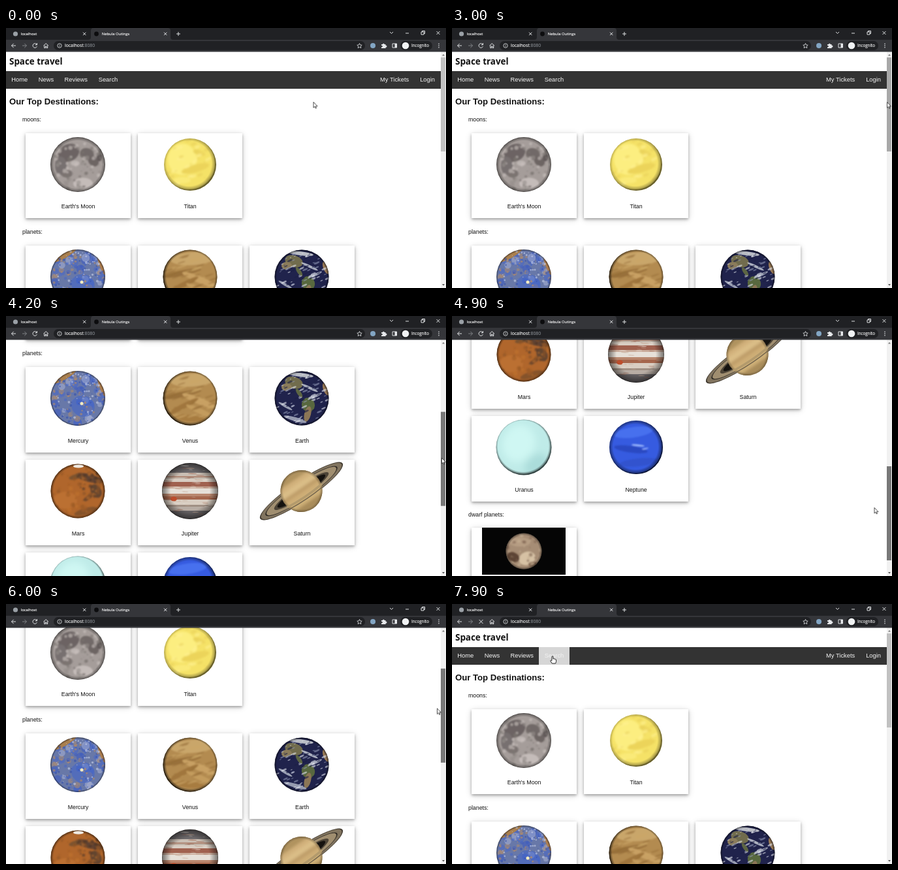
These frames come from a looping animation (674 px wide and 398 px high, 8000 ms). An HTML page:

```html
<!DOCTYPE html>
<html lang="en">
<head>
<meta charset="utf-8">
<title>Space travel</title>
<style>
@property --s { syntax: "<number>"; inherits: true; initial-value: 0; }
html, body { margin: 0; width: 100%; height: 100%; overflow: hidden; background: #fff; }
#stage {
  position: relative; width: 674px; height: 398px; overflow: hidden; background: #fff;
  font: 8.8px/20px "Liberation Sans", Arial, sans-serif; color: #111;
  animation: scroll 8s infinite;
}
#stage * { box-sizing: border-box; }
.abs, .card, .card svg, nav, nav span, #view, #page, #bar, #thumb, #chrome, #cursor { position: absolute; }
.abs, nav span { white-space: nowrap; }

#view { left: 0; top: 36px; width: 666px; height: 362px; overflow: hidden; }
#page { left: 0; top: -36px; width: 666px; height: 899px; transform: translateY(calc(var(--s) * -1px)); }
h1, h2 { margin: 0; left: 5px; font-weight: bold; }
h1 { top: 41px; font: bold 13.4px/20px "Open Sans", "Noto Sans", sans-serif; }
h2 { top: 103px; font-size: 13.15px; }
nav { left: 0; top: 66px; width: 666px; height: 27px; background: #333; color: #f4f4f4; font-size: 9.35px; line-height: 27px; }
nav span { top: 0; padding: 0 8.3px; height: 27px; }
#search { animation: hover 8s step-end infinite; }

.card { width: 160.5px; height: 130.5px; background: #fff; text-align: center;
  box-shadow: 0 2px 4px rgba(0,0,0,.3), 0 2px 10px rgba(0,0,0,.16); }
.card svg { left: 16px; top: 0; width: 128px; height: 96px; }
.card span { position: absolute; left: 0; right: 0; top: 102.5px; }
.card.wide { height: 106px; }
.wide svg { top: -12px; }
.wide span { top: 78px; }

#bar { left: 666px; top: 36px; width: 8px; height: 362px; background: #f1f1f1; }
#thumb { left: 0; top: 9px; width: 7px; height: 144px; background: #c1c1c1;
  transform: translateY(calc(var(--s) * .3988px)); animation: press 8s step-end infinite; }
#chrome { left: 0; top: 0; width: 674px; height: 37px; }
#chrome text { font: 6.2px "Open Sans", "Noto Sans", sans-serif; fill: #fff; stroke: #fff; stroke-width: .12; }
#chrome .address { font-size: 6.85px; }
.line { fill: none; stroke: #e8eaed; stroke-width: .95; }
.idle { animation: idle 8s step-end infinite; }
.busy { opacity: 0; animation: busy 8s step-end infinite; }

#cursor { left: 0; top: 0; width: 12px; height: 14px; overflow: visible; animation: move 8s infinite; }
#arrow { animation: arrow 8s step-end infinite; }
#hand { opacity: 0; animation: hand 8s step-end infinite; }

@keyframes scroll {
  0%, 41.25% { --s: 0; animation-timing-function: steps(3); }
  45% { --s: 86; animation-timing-function: steps(6); }
  52.5% { --s: 255; animation-timing-function: steps(7); }
  61.25% { --s: 464; animation-timing-function: steps(2); }
  63.75% { --s: 501; animation-timing-function: steps(9); }
  75% { --s: 135; animation-timing-function: steps(3); }
  78.75%, 100% { --s: 0; }
}
@keyframes move {
  0%, 21.25% { transform: translate(470.5px, 113px); animation-timing-function: steps(2); }
  23.75% { transform: translate(529px, 115px); animation-timing-function: steps(4); }
  28.75%, 33.75% { transform: translate(660px, 114px); animation-timing-function: steps(4); }
  38.75%, 41.25% { transform: translate(668px, 113px); animation-timing-function: steps(3); }
  45% { transform: translate(668px, 148px); animation-timing-function: steps(6); }
  52.5% { transform: translate(667px, 217px); animation-timing-function: steps(7); }
  61.25% { transform: translate(646.5px, 293px); animation-timing-function: steps(2); }
  63.75% { transform: translate(643px, 308px); animation-timing-function: steps(9); }
  75% { transform: translate(660px, 159.5px); animation-timing-function: steps(3); }
  78.75%, 81.25% { transform: translate(662px, 106px); animation-timing-function: steps(5); }
  87.5% { transform: translate(560px, 118px); animation-timing-function: steps(5); }
  93.75% { transform: translate(170px, 84px); animation-timing-function: steps(3); }
  97.5%, 100% { transform: translate(154px, 80px); }
}
@keyframes press {
  0% { background: #c1c1c1; }
  36.25% { background: #a8a8a8; }
  41.25% { background: #787878; }
  81.25%, 100% { background: #c1c1c1; }
}
@keyframes hover {
  0% { background: #333; color: #f4f4f4; }
  93.75%, 100% { background: #d6d6d6; color: #f2f2f2; }
}
@keyframes arrow { 0% { opacity: 1; } 93.75%, 100% { opacity: 0; } }
@keyframes hand { 0% { opacity: 0; } 93.75%, 100% { opacity: 1; } }
@keyframes idle { 0% { opacity: 1; } 98.75%, 100% { opacity: 0; } }
@keyframes busy { 0% { opacity: 0; } 98.75%, 100% { opacity: 1; } }
</style>
</head>
<body>
<div id="stage">
  <div id="view"><div id="page">
    <h1 class="abs">Space travel</h1>
    <nav>
      <span style="left:0">Home</span>
      <span style="left:41.5px">News</span>
      <span style="left:81.3px">Reviews</span>
      <span style="left:133.4px" id="search">Search</span>
      <span style="right:40.5px">My Tickets</span>
      <span style="right:.7px">Login</span>
    </nav>
    <h2 class="abs">Our Top Destinations:</h2>
    <div class="abs" style="left:25px;top:130px">moons:</div>
    <div class="abs" style="left:25px;top:302px">planets:</div>
    <div class="abs" style="left:25px;top:758px">dwarf planets:</div>
  </div></div>

  <div id="bar">
    <svg width="8" height="362" style="position:absolute"><path d="M2 6.5L4 4L6 6.5Z" fill="#777"/><path d="M2 356L4 358.5L6 356Z" fill="#505050"/></svg>
    <div id="thumb"></div>
  </div>

  <svg id="chrome" viewBox="0 0 674 37">
    <rect width="674" height="36" fill="#202124"/>
    <path d="M0 18H126Q130 18 130 14V4Q130 0 134 0H248Q252 0 252 4V14Q252 18 256 18H674V36.4H0Z" fill="#35363a"/>
    <circle cx="14.5" cy="9" r="3.6" fill="#9aa0a6"/>
    <circle class="idle" cx="138.5" cy="9" r="3.4" fill="#0c0c0e"/>
    <text x="22.7" y="11" style="font-size:5.9px">localhost</text>
    <text x="146.7" y="11" style="font-size:5.9px">Nebula Outings</text>
    <g class="line">
      <path d="M118 6.7l4.4 4.4m0-4.4l-4.4 4.4M242 6.7l4.4 4.4m0-4.4l-4.4 4.4M264 6v6m-3-3h6"/>
      <path d="M588 6l2.5 2.5L593 6M612 8h5M659.5 5l5 5m0-5l-5 5M636 6h4v4h-4zM637.5 6v-1.5h4v4H640"/>
      <path d="M15 27H8.5m3.2-3.2L8.5 27l3.2 3.2"/>
      <path d="M25 27h6.5m-3.2-3.2l3.2 3.2l-3.2 3.2" stroke="#85878b"/>
      <path class="idle" d="M47 25a3.3 3.3 0 1 0 .4 3.2M47.5 23.2v2.6h-2.6"/>
      <path class="busy" d="M41.5 24l6 6m0-6l-6 6"/>
      <path d="M57.5 27l3.7-3.3l3.7 3.3M58.7 26.5v4h1.7v-2.5h1.6v2.5h1.7v-4"/>
    </g>
    <rect x="73" y="20" width="477" height="14" rx="7" fill="#202124"/>
    <g class="line" style="stroke-width:.8">
      <circle cx="82" cy="27" r="3.2"/>
      <path d="M82 26.6v2M82 25v.8"/>
      <path d="M541.5 23.5l1.1 2.4l2.6.3l-1.9 1.800l.5 2.6l-2.3-1.3l-2.3 1.3l.5-2.6l-1.9-1.800l2.6-.3z"/>
    </g>
    <text x="90" y="29.4" class="address">localhost<tspan fill="#9aa0a6" stroke="none">:8080</tspan></text>
    <circle cx="562" cy="27" r="4" fill="#83a6c4"/>
    <path d="M575 25h2a1.3 1.3 0 1 1 2.6 0h2v2a1.3 1.3 0 1 1 0 2.4v1.6h-6.6v-2a1.2 1.2 0 1 0 0-2z" fill="#e8eaed"/>
    <path d="M592 24h6.5v6h-6.5z" class="line"/><path d="M595.5 24h3v6h-3z" fill="#e8eaed"/>
    <rect x="604" y="20" width="49" height="14" rx="7" fill="#202124"/>
    <circle cx="612" cy="27" r="5.3" fill="#f1f3f4"/>
    <text x="621" y="29.2">Incognito</text>
    <g fill="#e8eaed"><circle cx="663" cy="24.3" r=".8"/><circle cx="663" cy="27" r=".8"/><circle cx="663" cy="29.7" r=".8"/></g>
  </svg>

  <svg id="cursor" viewBox="0 0 12 14">
    <path id="arrow" d="M.5 .3V9L2.5 7.2L3.8 10L5 9.5L3.8 6.7H6.5Z" fill="#fff" stroke="#222" stroke-width=".8"/>
    <path id="hand" d="M-1 6.5V.4Q0-.8 1 .4V4Q2 3.2 2.8 4.2Q3.7 3.6 4.3 4.7Q5.7 4.5 5.5 6.2V8.5L4.6 11H-.7L-3.3 7Q-2.6 5.3 -1 6.5Z" fill="#fff" stroke="#111" stroke-width=".9"/>
  </svg>
</div>

<script>
let seed = 7;
const rnd = () => (seed = (seed * 16807) % 2147483647) / 2147483647;
const oval = (x, y, rx, ry, fill, turn = 0, o = 1) =>
  `<ellipse cx="${x}" cy="${y}" rx="${rx}" ry="${ry}" fill="${fill}" opacity="${o}" transform="rotate(${turn} ${x} ${y})"/>`;

// Scattered soft patches across a disc of radius r
function patches(n, r, colors, size, flat = 1, turn = 0) {
  let out = "";
  for (let i = 0; i < n; i++) {
    const a = rnd() * 6.283, d = Math.sqrt(rnd()) * r, k = size * (.4 + rnd());
    out += oval((d * Math.cos(a)).toFixed(1), (d * Math.sin(a)).toFixed(1), k, k * flat, colors[i % colors.length], turn, .6);
  }
  return out;
}

// A shaded globe: base colour, surface marks, blur of the marks, rim darkness, rim start, light offset
let count = 0;
function globe(r, base, marks, blur, rim, start = .85, lx = .5, ly = .5) {
  const id = "g" + count++;
  return `<defs><clipPath id="${id}c"><circle r="${r}"/></clipPath>
    <filter id="${id}b" x="-20%" y="-20%" width="140%" height="140%"><feGaussianBlur stdDeviation="${blur}"/></filter>
    <radialGradient id="${id}s" cx="${lx}" cy="${ly}" r=".51"><stop offset="${start}" stop-color="#000" stop-opacity="0"/>
    <stop offset=".95" stop-color="#000" stop-opacity="${rim * .45}"/><stop offset="1" stop-color="#000" stop-opacity="${rim}"/></radialGradient></defs>
    <circle r="${r}" fill="${base}"/><g clip-path="url(#${id}c)"><g filter="url(#${id}b)">${marks}</g></g>
    <circle r="${r}" fill="url(#${id}s)"/>`;
}

const bands = list => list.map(([y, h, c]) => `<rect x="-46" y="${y}" width="92" height="${h}" fill="${c}"/>`).join("");

const moon = () => globe(42, "#a59d9a",
  oval(-14, -18, 17, 13, "#6c6463", -25) + oval(14, -16, 11, 9, "#716967", 20) + oval(-26, 2, 9, 14, "#777070") +
  oval(24, -5, 9, 7, "#6d6564", 40) + oval(-17, 14, 9, 6, "#7b7371") + oval(33, -11, 4, 6, "#605958") +
  oval(8, 29, 15, 9, "#c4bcb9") + oval(-4, -2, 7, 4, "#bdb5b2") +
  patches(90, 41, ["#c9c2be", "#7c7472", "#958d8a"], 2.4), .8, .75);

const titan = () => globe(40, "#f5e267",
  oval(-12, -8, 22, 24, "#fcee80") + oval(8, 6, 22, 6, "#ecd45a", -15) + oval(14, -18, 10, 4, "#eed75e", 20) +
  oval(-12, 24, 13, 5, "#faea78") + patches(30, 38, ["#fff292", "#e8d05a"], 4, .5, -20), 1.8, .6, .84, .48, .48);

const mercury = () => globe(42, "#6878a8",
  patches(50, 40, ["#3e5cc0", "#a68a74", "#4a68c4", "#a4aed0"], 5) + oval(8, 12, 18, 16, "#3f62cc", 20, .5) +
  oval(-20, -33, 20, 4, "#a97f4e", -30) + oval(37, -18, 4, 16, "#ad7e50", -20) +
  patches(170, 41, ["#c8d0ea", "#3450ae", "#b08a68", "#5470c4"], 1.5) + oval(6, 8, 2.5, 2.5, "#f4ecc0"), .5, .6, .92);

const venus = () => globe(41.5, "#b38b50",
  oval(4, -28, 34, 10, "#c9a66b", -4) + oval(-12, -6, 30, 4, "#98703a", -12) + oval(14, 4, 28, 5, "#c8a063", 22) +
  oval(-12, 13, 28, 4, "#a0763c", -28) + oval(16, 20, 24, 4, "#c39b5d", 24) + oval(-4, 30, 26, 5, "#a77c41", 6) +
  patches(40, 38, ["#cba668", "#966e38"], 7, .16, -18), 1.1, .9, .88, .51, .49);

const earth = () => globe(41.5, "#20234c",
  oval(-12, -24, 14, 9, "#716c4d", 18) + oval(-23, -17, 8, 6, "#8b7c5b") + oval(-4, -8, 3, 8, "#5c6543", -35) +
  oval(10, 10, 10, 11, "#58683f", -18) + oval(9, 24, 5, 12, "#8c7656", 14) + oval(37, -14, 4, 10, "#9b7b56", -20) +
  oval(-2, -36, 20, 3, "#b9bcc4", 7) + oval(12, -16, 14, 2, "#d0d4dd", 25, .8) + oval(20, -3, 12, 2, "#c3c8d5", -25, .8) +
  oval(-25, 12, 12, 2, "#b9bfcd", 30, .8) + oval(-10, 32, 18, 3, "#b4bac9", 16, .8) +
  patches(100, 40, ["#e2e6ee", "#8d96b4", "#1b1e44"], 3.4, .32, -24), .6, .75, .9);

const mars = () => globe(41.5, "#b0662c",
  oval(17, -20, 21, 6, "#5f4230", 14) + oval(28, 0, 8, 11, "#64452f", -30) + oval(-3, -22, 11, 4, "#7c522f", -15) +
  oval(-19, 14, 18, 13, "#bb7031") + oval(12, 31, 18, 5, "#85532c", -16) + oval(16, 10, 10, 3, "#6f472b", -35) +
  patches(50, 40, ["#8f5527", "#a05e28", "#c0732f"], 2.6) +
  oval(0, 0, 0, 0, "none") + `<g transform="translate(16 -10)">${patches(35, 22, ["#4a3428", "#8a5428"], 2.2)}</g>`, .8, .8, .88) +
  oval(1, -38, 8, 2.5, "#eee9e2");

const jupiter = () => globe(43, "#beb2a6",
  bands([[-43, 15, "#6e6a6c"], [-28, 5, "#cabfb4"], [-23, 2, "#b08a78"], [-19, 5, "#d8cdc2"], [-14, 7, "#a0614f"],
    [-7, 3, "#c9ab9a"], [-4, 8, "#e6e0d8"], [4, 4, "#b9876e"], [8, 5, "#a5664c"], [13, 8, "#d9cec2"],
    [21, 3, "#a09084"], [24, 6, "#b8ada4"], [30, 14, "#6a6668"]]) +
  patches(50, 40, ["#eee7df", "#a06a58", "#c4a692"], 5, .12, 2) + oval(-25, 12, 5, 3.5, "#bd4d2c"), .6, 1, .68);

// The ring system lies flat; its near half is drawn again over the globe
const ring = [[76, 15.5, "#40392f"], [74, 14.8, "#81745f"], [66, 12.5, "#2f2a24"], [64, 12, "#a08e70"], [50, 9, "#4d4437"], [44, 7.5, "#15120f"]];
const farRing = ring.map(([a, b, c]) => oval(0, 0, a, b, c)).join("");
const nearRing = `<path d="M-32 8.5A57 10.5 0 0 0 32 8.5" fill="none" stroke="#b39a6c" stroke-width="3.5"/>
  <path d="M-30 12.8A70 14 0 0 0 30 12.8" fill="none" stroke="#75664e" stroke-width="1.4"/>`;
const saturn = () => `<g transform="translate(-.5 0) rotate(-34)">${farRing}
  ${globe(32, "#cdac75", bands([[-32, 12, "#b0935f"], [-20, 7, "#d1b07a"], [-13, 9, "#dabd87"], [-4, 5, "#bb9a66"], [8, 10, "#ceb078"], [20, 12, "#a98c5a"]]), 2, .5)}
  ${nearRing}</g>`;

const uranus = () => globe(42.5, "#bfebe8", oval(-8, -6, 25, 29, "#cff7f3", 20) + oval(20, 27, 20, 15, "#aadcda", -35), 6, .75, .9, .49, .48);
const neptune = () => globe(41, "#365be0",
  oval(-4, -23, 30, 8, "#4670ee", -8) + oval(-8, 3, 26, 5, "#2a4ac2", 8) + oval(4, 23, 30, 6, "#3152ce", -6) +
  oval(3, -3, 10, 1.3, "#a9c3ff", 6) + oval(14, 2, 5, 1, "#94b1ff", -12), 1.2, .95, .82, .49, .49);
const pluto = () => `<rect x="-64" y="-36" width="128" height="72" fill="#050505"/>` + globe(27.5, "#a68d75",
  oval(5, 11, 13, 10, "#d6c1a4", -20) + oval(-16, 9, 10, 7, "#5d4535", 25) + oval(14, 20, 7, 4, "#795d48") +
  oval(-6, -14, 16, 7, "#b69d83") + patches(30, 26, ["#806653", "#c7b094"], 2.2), .9, .7);

const rows = [
  [160.5, ["Earth's Moon", moon], ["Titan", titan]],
  [333, ["Mercury", mercury], ["Venus", venus], ["Earth", earth]],
  [475, ["Mars", mars], ["Jupiter", jupiter], ["Saturn", saturn]],
  [617, ["Uranus", uranus], ["Neptune", neptune]],
  [788, ["Pluto", pluto]]
];
document.getElementById("page").insertAdjacentHTML("beforeend", rows.map(([top, ...cards]) =>
  cards.map(([name, draw], i) => `<div class="card ${name === "Pluto" ? "wide" : ""}" style="left:${30.3 + i * 171.5}px;top:${top}px">
    <svg viewBox="-64 -48 128 96" overflow="visible">${draw()}</svg><span>${name}</span></div>`).join("")).join(""));
</script>
</body>
</html>
```
